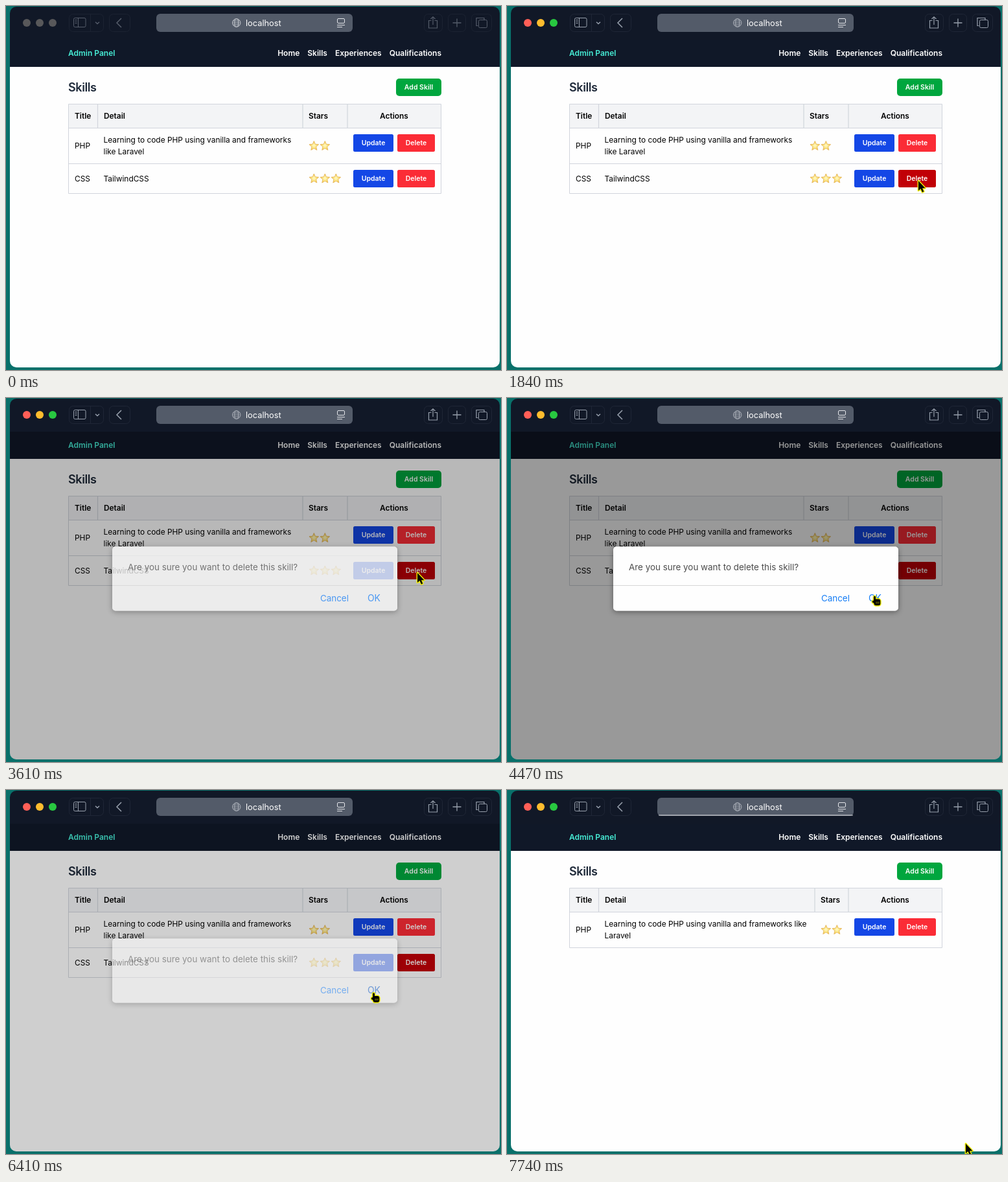
An HTML page with a canvas that plays this animation: 764 by 562 pixels, repeating every 8 s.

```html
<!DOCTYPE html>
<html lang="en">
<head>
<meta charset="utf-8">
<title>Admin Panel</title>
<style>
html, body { margin: 0; width: 100%; height: 100%; overflow: hidden; background: #09706a; }
canvas { display: block; width: 764px; height: 562px; }
</style>
</head>
<body>
<canvas id="stage" width="764" height="562"></canvas>
<script>
const ctx = document.getElementById('stage').getContext('2d');
const LOOP = 8000;
const FOCUS = 360, HOVER = 1730, ASK = 3550, PRESS = 6290, RELOAD = 6530, REMOVED = 6590;
const BODY = 11.9, BOLD = 600;
const BLUE = '#1447e6', RED = '#fb2c36', RULE = '#d1d5dc';

const ramp = (t, from, to) => Math.min(1, Math.max(0, (t - from) / (to - from)));
const smooth = u => u * u * (3 - 2 * u);

function fill(color, x, y, w, h, r = 0) {
  ctx.fillStyle = color;
  ctx.beginPath();
  ctx.roundRect(x, y, w, h, r);
  ctx.fill();
}

function frame(color, x, y, w, h, r = 0) {
  ctx.strokeStyle = color;
  ctx.lineWidth = 1;
  ctx.beginPath();
  ctx.roundRect(x, y, w, h, r);
  ctx.stroke();
}

function line(color, width, ...pts) {
  ctx.strokeStyle = color;
  ctx.lineWidth = width;
  ctx.beginPath();
  for (let i = 0; i < pts.length; i += 2) ctx.lineTo(pts[i], pts[i + 1]);
  ctx.stroke();
}

function text(str, x, y, size = BODY, color = '#000', weight = 400, align = 'left') {
  ctx.font = `${weight} ${size}px Inter, "Liberation Sans", sans-serif`;
  ctx.textAlign = align;
  ctx.fillStyle = color;
  ctx.fillText(str, x, y);
}

function drawAddress(t, active) {
  const ink = active ? '#a9aeb7' : '#c3c7cd';
  fill('#535b69', 232, 12, 303, 28, 6);
  if (t >= RELOAD) {
    const width = 62 * ramp(t, RELOAD, 7060) + 238 * ramp(t, 7360, 7560);
    fill(`rgba(255,255,255,${.75 - .3 * ramp(t, 7680, 7740)})`, 234, 38, width, 2, 1);
  }
  frame(ink, 349.5, 19.8, 12.4, 12.4, 6.2);
  frame(ink, 352.9, 19.8, 5.6, 12.4, [2.8, 2.8]);
  for (const dy of [-3, 0, 3]) line(ink, .8, 350.3, 26 + dy, 361, 26 + dy);
  text('localhost', 370, 31, 12.8, '#fff');
  frame('#e3e5e9', 511.5, 19.5, 11, 7, 1.5);
  line('#e3e5e9', 1, 511, 29.5, 523, 29.5);
  line('#e3e5e9', 1, 511, 32.5, 519, 32.5);
}

function drawToolbar(t) {
  const active = t >= FOCUS;
  const edge = active ? '#1f2636' : '#1c2332';
  const icon = active ? '#98a0ad' : '#555c6a';
  fill('#111827', 6, 1, 756, 51);
  ['#ff5f57', '#febc2e', '#28c840'].forEach((color, i) =>
    fill(active ? color : '#58585a', 26 + i * 20, 20, 12, 12, 6));

  for (const [x, w] of [[97.5, 53], [159.5, 32], [645.5, 28], [682.5, 27], [718.5, 31]]) {
    frame(edge, x, 12.5, w, 27, 6);
  }
  line(edge, 1, 130.5, 13, 130.5, 39);

  // Sidebar, menu, back
  frame(icon, 104.5, 18.5, 18.5, 14, 2);
  line(icon, 1, 111.5, 19, 111.5, 32);
  for (let i = 0; i < 3; i++) line(icon, 1, 106.5, 21.5 + i * 2.5, 109.5, 21.5 + i * 2.5);
  line(icon, 1.4, 138, 24.8, 141, 27.6, 144, 24.8);
  line(icon, 1.5, 178, 19, 171, 26, 178, 33);

  drawAddress(t, active);

  // Share, new tab, tab overview
  line(icon, 1.2, 656.5, 22.5, 652.5, 22.5, 652.5, 34, 665.5, 34, 665.5, 22.5, 661.5, 22.5);
  line(icon, 1.2, 659, 29, 659, 17);
  line(icon, 1.2, 655.5, 20, 659, 16.7, 662.5, 20);
  line(icon, 1.3, 689.5, 26, 702.5, 26);
  line(icon, 1.3, 696, 19.5, 696, 32.5);
  line(icon, 1.2, 728.5, 30.5, 726, 30.5, 726, 18.5, 738, 18.5, 738, 21);
  frame(icon, 729.5, 21.5, 13, 12, 2);
}

function drawNav() {
  fill('#101828', 6, 52, 756, 42);
  text('Admin Panel', 96, 77, 12, '#46ecd5', BOLD);
  let right = 672;
  for (const label of ['Qualifications', 'Experiences', 'Skills', 'Home']) {
    text(label, right, 77, 12, '#fff', BOLD, 'right');
    right -= ctx.measureText(label).width + 12;
  }
}

function stars(count, x, cy) {
  for (let n = 0; n < count; n++) {
    const cx = x + n * 17;
    ctx.beginPath();
    for (let i = 0; i < 10; i++) {
      const a = (i / 5 - .5) * Math.PI, r = i % 2 ? 3.6 : 7.7;
      ctx.lineTo(cx + r * Math.cos(a), cy + r * Math.sin(a));
    }
    ctx.closePath();
    const gold = ctx.createRadialGradient(cx, cy - 1, 1, cx, cy, 7.5);
    gold.addColorStop(0, '#fff6b8');
    gold.addColorStop(1, '#f6cb3c');
    ctx.fillStyle = gold;
    ctx.fill();
    ctx.strokeStyle = '#dfa748';
    ctx.lineWidth = .7;
    ctx.stroke();
  }
}

function button(label, x, y, w, color, r = 2.5) {
  fill(color, x, y, w, 27, r);
  text(label, x + w / 2, y + 17.2, 10.5, '#fff', BOLD, 'center');
}

function actions(y, hovered) {
  button('Update', 536, y, 62, BLUE);
  button('Delete', 604, y, 58, hovered ? '#c10007' : RED);
}

function drawTable(t) {
  const removed = t >= REMOVED;
  const starCol = removed ? 475 : 458;
  fill('#f3f4f6', 97, 152, 575, 36);
  frame(RULE, 96.5, 151.5, 575, removed ? 92 : 138);
  line(RULE, 1, 97, 188.5, 671, 188.5);
  for (const x of [141.5, starCol, 527]) line(RULE, 1.2, x, 152, x, 188);

  text('Title', 106, 174.2, BODY, '#000', BOLD);
  text('Detail', 151, 174.2, BODY, '#000', BOLD);
  text('Stars', starCol + 9, 174.2, BODY, '#000', BOLD);
  text('Actions', 599, 174.2, BODY, '#000', BOLD, 'center');

  text('PHP', 106, 220.2);
  text('Learning to code PHP using vanilla and frameworks' + (removed ? ' like' : ''), 150.5, 211.2);
  text(removed ? 'Laravel' : 'like Laravel', 150.5, 229.2);
  stars(2, starCol + 17.3, 216.2);
  actions(198, false);
  if (removed) return;

  line(RULE, 1, 97, 243.5, 671, 243.5);
  text('CSS', 106, 270.5);
  text('TailwindCSS', 150.5, 270.5);
  stars(3, starCol + 17.3, 266.7);
  actions(253, t >= HOVER);
}

function drawPage(t, fade) {
  fill('#fefefe', 6, 94, 756, 464);
  drawNav();
  ctx.letterSpacing = '-0.4px';
  text('Skills', 96, 131.6, 18, '#1e2939', BOLD);
  ctx.letterSpacing = '0px';
  button('Add Skill', 602, 112, 70, '#00a63e', 5);
  drawTable(t);
  fill(`rgba(0,0,0,${.4 * fade ** 1.3})`, 6, 52, 756, 506);
}

function drawDialog(t, fade) {
  const rect = [164, 229.5, 440, 99, 5];
  ctx.save();
  ctx.globalAlpha = fade;

  // Shadow falls only outside the panel
  ctx.save();
  ctx.beginPath();
  ctx.rect(0, 0, 764, 562);
  ctx.roundRect(...rect);
  ctx.clip('evenodd');
  ctx.shadowColor = 'rgba(0,0,0,.4)';
  ctx.shadowBlur = 9;
  ctx.shadowOffsetY = 2;
  fill('#fff', ...rect);
  ctx.restore();

  fill('#fefefe', ...rect);
  line('#d6d6d6', 1, 164, 289.5, 604, 289.5);
  text('Are you sure you want to delete this skill?', 188, 265.5, 13.42, '#4c4c4c');
  text('Cancel', 485, 314.4, 13.4, '#147cf5');
  text('OK', 558, 314.4, 13.9, t >= PRESS ? '#0a58c4' : '#147cf5');
  ctx.restore();
}

const arrow = new Path2D('M0 0V15L3.5 12 6 17.4 8.3 16.4 6 11.2H10.5Z');
const hand = new Path2D();
hand.roundRect(-2, .8, 3, 12, 1.5);
hand.roundRect(-1.5, 5.5, 9.8, 9.8, 3);
hand.roundRect(-4.2, 7.8, 7, 3.4, 1.7);

// Start, end and destination of each glide
const glides = [
  [360, 920, 583, 401],
  [1220, 1840, 635, 270],
  [4150, 4470, 568, 305],
  [4470, 4700, 568, 312.5],
  [RELOAD, 7060, 708, 546]
];

function drawPointer(t) {
  let x = 712, y = 564;
  for (const [from, to, tx, ty] of glides) {
    const u = smooth(ramp(t, from, to));
    x += (tx - x) * u;
    y += (ty - y) * u;
  }
  const path = t > 4300 && t < REMOVED ? hand : arrow;
  ctx.save();
  ctx.translate(x, y);
  ctx.lineJoin = 'round';
  ctx.strokeStyle = '#f2f000';
  ctx.lineWidth = 2.8;
  ctx.stroke(path);
  ctx.fillStyle = '#000';
  ctx.fill(path);
  if (path === hand) for (let k = 2; k < 7; k += 2) line('#d8d600', .6, k, 9.5, k, 12.5);
  ctx.restore();
}

function dialogFade(t) {
  if (t < ASK) return 0;
  return ramp(t, ASK - 120, ASK + 120) * (1 - ramp(t, PRESS, PRESS + 180) ** 2);
}

function draw(t) {
  const fade = dialogFade(t);
  fill('#09706a', 0, 0, 764, 562);
  ctx.save();
  ctx.beginPath();
  ctx.roundRect(6, 1, 756, 557, 10);
  ctx.clip();
  drawToolbar(t);
  drawPage(t, fade);
  ctx.restore();
  if (fade) drawDialog(t, fade);
  if (t >= FOCUS) drawPointer(t);
}

const start = performance.now();
function tick() {
  draw((performance.now() - start) % LOOP);
  requestAnimationFrame(tick);
}
tick();
</script>
</body>
</html>
```
